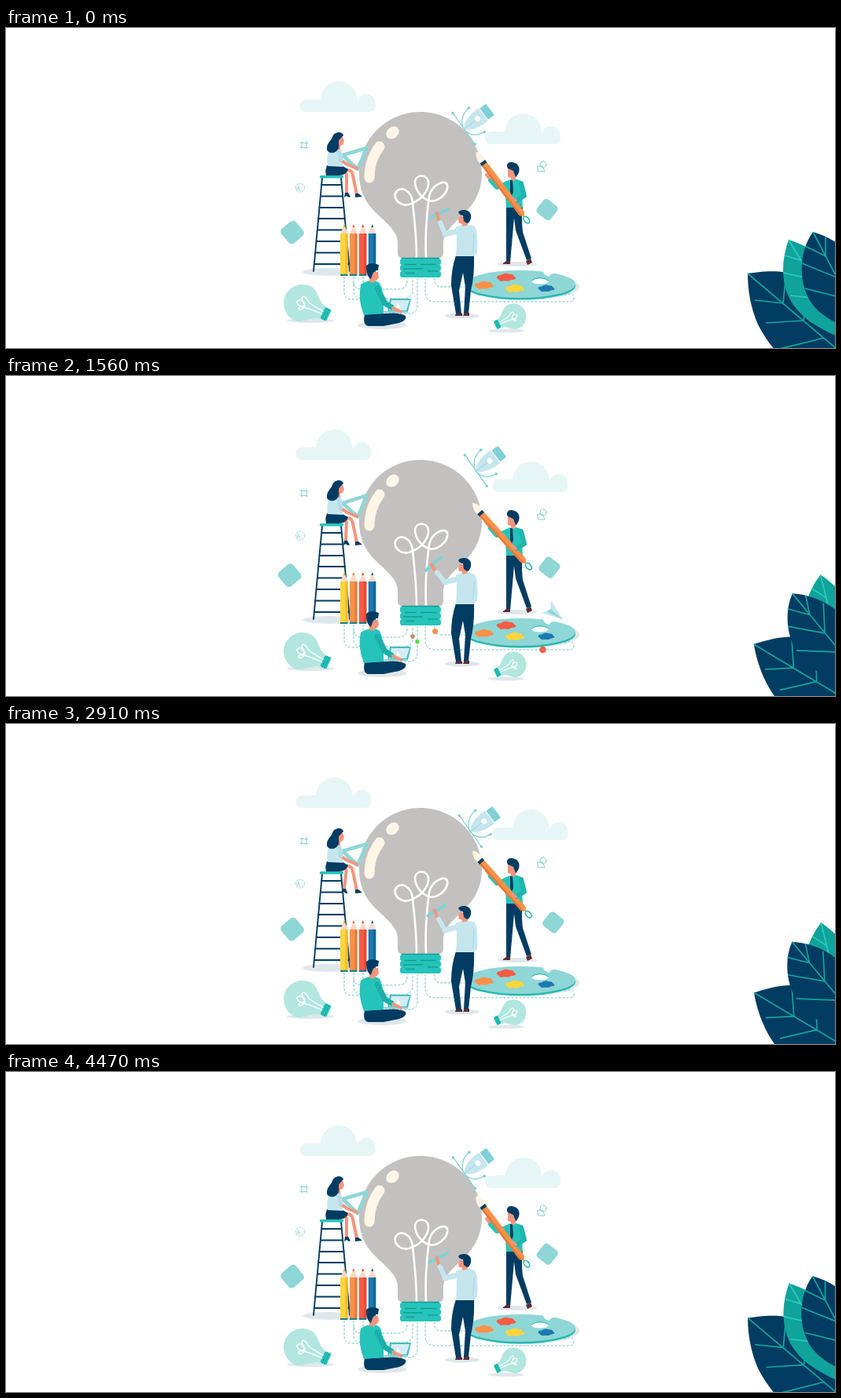
These frames come from a looping animation (1054x408 px, 4500 ms). An HTML page:

```html
<!DOCTYPE html>
<html lang="en">
<head>
<meta charset="utf-8">
<title>Creative team around a light bulb</title>
<style>
html, body { margin: 0; width: 100%; height: 100%; overflow: hidden; background: #fff; }
svg { display: block; width: 100vw; height: 100vh; }
.navy { fill: #023c62; } .teal { fill: #25c4bb; } .aqua { fill: #8fd6d6; } .pale { fill: #c6e6ee; }
.skin { fill: #f2957d; } .shade { fill: #dfe7ea; } .cloud { fill: #e6f5f6; } .green { fill: #10a39b; }
.line { fill: none; stroke-linecap: round; stroke-linejoin: round; }
.wire { fill: none; stroke: #6cc3cc; stroke-dasharray: 3 2; }
.vein { fill: none; stroke: #12a59d; stroke-width: 1.7; }
.limb { fill: none; stroke: #f2957d; stroke-width: 4; stroke-linecap: round; stroke-linejoin: round; }
</style>
</head>
<body>
<svg viewBox="0 0 1054 408" preserveAspectRatio="none">
<defs>
  <g id="cloud" class="cloud">
    <rect x="374" y="91" width="96" height="16" rx="8"/>
    <path d="M400 107V91a23 23 0 0 1 46 0v16z"/>
    <circle cx="458" cy="95.5" r="11.5"/><circle cx="388" cy="99" r="8"/>
  </g>
  <path id="glass" d="M527 107C484 107 449 142 449 185C449 214 462 228 476 241C490 254 498 262 498 275V287Q498 293 504 293H550Q556 293 556 287V275C556 262 566 252 579 240C592 228 605 212 605 185C605 142 570 107 527 107Z"/>
  <path id="filament" class="line" stroke="#fff" d="M522 293C522 262 518 235 517 222C515 206 500 200 495 211C493 221 505 230 517 223C530 218 538 205 537 196C535 186 521 186 520 196C520 208 530 218 538 220C548 223 563 211 561 200C558 192 541 200 538 215C535 235 533 265 534 293"/>
  <g id="shine">
    <ellipse cx="491.5" cy="133.500" rx="9" ry="7.200" transform="rotate(-42 491.500 133.500)"/>
    <path class="line" stroke-width="13" d="M475 151C466 163 462 175 462 191"/>
  </g>
  <g id="mini">
    <path fill="#b2e6df" d="M0-24A24 24 0 1 0 0 24C12 24 18 9 28 9V-9C18-9 12-24 0-24Z"/>
    <rect class="teal" x="28" y="-8" width="9" height="16" rx="2"/>
    <path d="M31-8V8M34-8V8" stroke="#17a39b"/>
    <path class="line" stroke="#fff" stroke-width="1.400" d="M28-2C14-3 9-3 6-5C-3-12 -6-7 -2-4C3 0 5 1 1 4C-4 5 -8 3 -7 0C-6-4 -2-3 3 0C7 4 0 12 -2 8C-2 4 10 2 28 2"/>
  </g>
  <path id="splat" d="M-12 1C-13-4 -6-2 -5-4C0-7 3-4 6-4C10-4 9-1 12 0C13 4 6 2 5 4C1 6 -2 3 -5 5C-9 5 -8 3 -12 1Z"/>
</defs>

<use id="cloudL" href="#cloud"/>
<use id="cloudR" href="#cloud"/>

<!-- small icons -->
<g class="line" stroke="#7fd0d2">
  <path d="M376 145v9M382 144v9M374 146l10 1M374 152l10 1"/>
  <g stroke-dasharray="2 2"><circle cx="374" cy="203.500" r="5.500"/></g>
  <path d="M676 176l6 0 3 7-8 0z"/><circle cx="683" cy="174" r="4"/>
</g>
<text x="369" y="207" font-family="Inter, sans-serif" font-size="8" fill="#7fd0d2">A</text>
<g id="tileL"><rect class="aqua" x="-12" y="-12" width="24" height="24" rx="5" transform="rotate(-40)"/></g>
<g id="tileR"><rect class="aqua" x="-11" y="-11" width="22" height="22" rx="4.500" transform="rotate(38)"/></g>

<g id="plane">
  <path class="pale" d="M14 0L-13-10L-7 0Z"/>
  <path class="pale" d="M14 0L-13 10L-7 1Z"/>
  <path class="aqua" d="M14 0L-7-1L-9 5Z"/>
</g>

<!-- floor shadows -->
<g class="shade">
  <ellipse cx="412" cy="311" rx="35" ry="5"/><ellipse cx="478" cy="379" rx="31" ry="5"/>
  <ellipse cx="387" cy="373" rx="30" ry="3"/><ellipse cx="636" cy="386" rx="23" ry="2.500"/>
  <ellipse cx="580" cy="367" rx="22" ry="3.500"/><ellipse cx="650" cy="301" rx="25" ry="3"/>
  <ellipse cx="659" cy="330" rx="70" ry="17"/>
</g>

<!-- wires and their pulses -->
<g id="wires" class="wire">
  <path d="M442 317V335Q442 345 453 345H504Q517 345 517 334V319"/>
  <path d="M454 317V352Q454 364 464 364H511Q523 364 523 353V319"/>
  <path d="M466 317V325Q466 333 474 333H498Q510 333 510 322V319"/>
  <path d="M585 330H554Q545 330 545 322V319"/>
  <path d="M711 341Q709 338 718 339Q722 340 722 344Q722 349 716 349H546Q533 349 533 337V319"/>
</g>
<path class="wire" d="M430 317V336Q430 346 440 346H450M442 325Q443 333 452 333"/>
<g id="dots"></g>

<!-- main bulb -->
<use href="#glass" fill="#c2c1bf"/>
<use href="#shine" fill="#fdf5e6" stroke="#fdf5e6" stroke-width="0"/>
<use href="#filament" stroke-width="2.600"/>
<g id="glow">
  <use href="#glass" fill="#ffd53e"/>
  <path fill="#ffc533" d="M530 107C570 112 590 146 590 180C590 208 577 226 560 240C540 253 528 262 528 278V293H550Q556 293 556 287V275C556 262 566 252 579 240C592 228 605 212 605 185C605 142 570 107 530 107Z"/>
  <use href="#shine" fill="#fffbc4" stroke="#fffbc4" stroke-width="0"/>
  <use href="#filament" stroke-width="2"/>
</g>
<rect x="503" y="293" width="48" height="24" fill="#17a39b"/>
<g class="teal">
  <rect x="501" y="294" width="52" height="8" rx="3"/><rect x="501" y="302" width="52" height="8" rx="3"/>
  <rect x="501" y="310" width="52" height="8" rx="3"/>
</g>
<path d="M503 293.500H551M507 301.500H522M527 301.500H547M505 307H530M536 310H549M508 312.500H520" stroke="#149c95" stroke-width="1.300"/>

<!-- design pen -->
<g id="pen">
  <g class="line" stroke="#7fcfd6" stroke-width="1.200">
    <path d="M568 108L596 148M589 102C577 110 578 128 585 132C593 138 601 137 608 132"/>
  </g>
  <g fill="#7fcfd6">
    <circle cx="568" cy="108.500" r="1.800"/><circle cx="588.500" cy="102" r="1.800"/>
    <circle cx="608" cy="132.500" r="1.800"/><circle cx="596" cy="148" r="1.800"/>
  </g>
  <g transform="translate(582 129) rotate(-37)">
    <path class="pale" d="M0 0C5-6 14-11 31-10V10C14 11 5 6 0 0Z"/>
    <path d="M0 0H20" stroke="#9fd7df"/><circle cx="22" cy="0" r="3.500" fill="#fff"/>
    <rect x="32" y="-9" width="10" height="18" rx="1.500" fill="#7fcfd6"/>
  </g>
</g>

<!-- ladder -->
<g class="line" stroke="#023c62" stroke-width="1.900">
  <path d="M402 191L391 310M426 191L437 310"/><path id="rungs"/>
</g>
<rect class="teal" x="399" y="188" width="30" height="3.500" rx="1"/>

<!-- woman on the ladder -->
<g id="ruler"><path class="line" stroke="#8fd6d6" stroke-width="4.500" d="M428 162L459 153L447 180Z"/></g>
<g id="leg">
  <path class="limb" d="M425 183Q434 181 433 190L433 212"/>
  <path class="navy" d="M431 210h4l3 5-2 1-3-2-3 2z"/>
</g>
<path class="limb" d="M430 182Q440 179 441 188L446 212"/>
<path class="navy" d="M444 211h4l5 4-9 1z"/>
<path class="navy" d="M409 174Q405 180 407 188H424Q433 187 435 180L426 175Z"/>
<path class="pale" d="M411 154Q418 150 424 153Q429 158 428 177L409 176Q407 164 411 154Z"/>
<path class="limb" stroke-width="3" d="M425 168L434 174L446 179"/>
<path class="line" stroke="#b5dde8" stroke-width="5" d="M422 157L426 168"/>
<path class="skin" d="M422 139h6l2 5-2 5-3 1v5h-5z"/>
<path class="navy" d="M429 137C428 131 417 132 415 139C413 144 408 147 408 153C407 160 418 161 421 156C426 151 421 147 424 142Z"/>

<g id="pencils"></g>

<!-- small bulbs -->
<use href="#mini" transform="translate(377 351) rotate(25)"/>
<use href="#mini" transform="translate(645 368) scale(-.69 .69) rotate(26)"/>

<!-- seated man -->
<path class="navy" d="M456 365L482 364Q500 362 508 367Q510 373 500 376L480 380H460Q453 378 456 365Z"/>
<path fill="#45bfc0" d="M488 345H515L511 362H485Z"/><path fill="#d3ecf2" d="M490 347H513L509 360H487Z"/>
<path d="M477 362H511" stroke="#8fd6d6" stroke-width="2"/>
<path d="M497 350l5 6-3 0-2 2z" fill="#fff"/>
<path class="teal" d="M451 327Q463 319 474 324Q481 332 480 364L455 366Q447 347 451 327Z"/>
<path class="line" stroke="#1cb0a8" stroke-width="7" d="M472 332L482 351L490 356"/>
<path class="limb" stroke-width="3" d="M492 357L502 362"/>
<path class="skin" d="M461 311h12l1 7-3 4h-3v3l-6-1z"/>
<path class="navy" d="M458 306C457 300 466 299 474 302L473 309H469L466 314L464 320Q458 316 458 306Z"/>

<!-- palette -->
<ellipse cx="654" cy="329" rx="70" ry="17.500" fill="#25b9b2"/>
<ellipse cx="654" cy="326.500" rx="70" ry="17.500" class="aqua"/>
<path fill="#fff" d="M683 308L700 312Q690 314 691 317Q682 315 683 308Z"/>
<ellipse cx="679" cy="323" rx="11" ry="3.500" fill="#fff"/>
<path class="line" stroke="#25b9b2" d="M668 322Q679 315 690 322"/>
<use href="#splat" x="608" y="328" fill="#f9914a"/><use href="#splat" x="636" y="318" fill="#f95a45"/>
<use href="#splat" x="647" y="332" fill="#ffd53e"/><use href="#splat" transform="translate(687 332) scale(.85)" fill="#1b7ab0"/>

<!-- drafting man -->
<path class="navy" d="M572 290H595Q596 315 591 335L588 364H582L584 330L581 312L576 335L579 364H572L566 328Q566 308 572 290Z"/>
<path d="M572 364h8v3h-9zM583 363h6v4h-8z" fill="#5b2e35"/>
<g id="forearm">
  <path class="limb" stroke-width="3.500" d="M552 250L549 240"/>
  <path class="line" stroke="#7fd3d6" stroke-width="4" stroke-linecap="butt" d="M539 242L562 231"/>
  <path class="limb" stroke-width="3" d="M549 239L548 236"/>
  <path class="line" stroke="#c6e6ee" stroke-width="6" d="M558 262L552 248"/>
</g>
<path class="line" stroke="#c6e6ee" stroke-width="7" d="M577 258L558 263"/>
<path class="pale" d="M572 254Q584 248 596 253Q601 262 599 287L594 291H572Q574 270 572 254Z"/>
<path d="M595 262L594 286" stroke="#a8d6e3" stroke-width="1.300"/>
<path class="skin" d="M577 240h10v11l-6 2-2-4h-3l-1-5z"/>
<path class="navy" d="M575 235C578 230 590 231 591 238C592 244 589 249 586 249L582 246L581 239Q577 239 575 235Z"/>

<!-- painter -->
<path class="navy" d="M636 228H657Q655 244 657 260L668 294L662 296L648 258L646 242L641 299H636Z"/>
<path d="M632 300l4-3h5v4h-9zM661 297l6-3 2 5-6 3z" fill="#5b2e35"/>
<path class="line" stroke="#25c4bb" stroke-width="6" d="M638 198L624 203L616 194"/>
<path class="limb" d="M614 191L611 187"/>
<path class="teal" d="M634 196Q645 190 655 195L657 229H636Z"/>
<path class="navy" d="M641 194h3l1 15-2 5-2-5z"/>
<path class="skin" d="M638 179h12v9l-4 7-4-1v-3l-4-1z"/>
<path class="navy" d="M637 177C636 169 646 170 650 174C655 179 652 187 648 190L645 182L638 179Z"/>
<g id="brush"><g transform="translate(598 160) rotate(53)">
  <path fill="#fdf3e2" d="M-2-1Q6-7 14-4V4Q6 6 -2-1Z"/>
  <path fill="#f9914a" d="M16-4H96L101 0L96 4H16Z"/><path fill="#e5793a" d="M16 1.500H99L96 4H16Z"/>
  <rect class="navy" x="13" y="-4" width="4" height="8"/>
  <ellipse class="line" cx="106" cy="0" rx="5" ry="3" stroke="#25b9b2" stroke-width="1.600"/>
</g></g>
<path class="line" stroke="#1fb6ae" stroke-width="6" d="M655 198L659 214L649 220"/>
<path class="limb" d="M648 220L644 217"/>

<!-- leaves -->
<g id="leafA">
  <path class="navy" d="M943 313C965 310 1010 302 1045 340C1070 370 1085 400 1085 450H1030C990 430 970 405 956 378C947 357 943 335 943 313Z"/>
  <path class="vein" d="M943 313L1070 421M988 351L952 347M1014 373L966 376M988 351L992 311M1014 373L1021 324M1040 395L980 410"/>
</g>
<g id="leafB">
  <path class="green" d="M995 270C984 300 985 335 1005 358C1020 378 1050 390 1072 400C1090 350 1060 290 995 270Z"/>
  <path class="vein" style="stroke:#2cc9bf" d="M995 270L1072 400M1010 296L990 290M1024 320L988 312M1040 346L997 341"/>
</g>
<g id="leafC">
  <path class="navy" d="M1026 260C1008 285 1006 325 1025 352C1040 372 1065 380 1096 394C1112 330 1080 275 1026 260Z"/>
  <path class="vein" d="M1026 260L1096 394M1042 291L1016 278M1056 318L1012 300M1071 346L1016 332M1042 291L1042 266M1056 318L1062 280"/>
</g>
</svg>

<script>
const LOOP = 4500;
const $ = id => document.getElementById(id);

// Linear interpolation through rows of [time, ...values].
function key(t, rows) {
  const n = rows.findIndex(row => row[0] >= t);
  if (n < 0) return rows[rows.length - 1].slice(1);
  if (!n) return rows[0].slice(1);
  const a = rows[n - 1], b = rows[n], k = (t - a[0]) / (b[0] - a[0]);
  return a.slice(1).map((v, i) => v + (b[i + 1] - v) * k);
}
const move = (id, [x, y], turn = 0) =>
  $(id).setAttribute('transform', `translate(${x} ${y}) rotate(${turn})`);
const spin = (id, angle, x, y) => $(id).setAttribute('transform', `rotate(${angle} ${x} ${y})`);

const rungAt = y => {
  const d = (y - 191) * 11 / 119;
  return `M${402 - d} ${y}H${426 + d}`;
};
$('rungs').setAttribute('d', [200, 214.5, 229, 243, 257.5, 272, 286.5, 301].map(rungAt).join(''));

$('pencils').innerHTML = [
  ['#ffd53e', '#f0bd2c'], ['#f9914a', '#e5793a'], ['#fb5a44', '#e04a3a'], ['#1b7ab0', '#14658f']
].map(([main, dark], i) => `<g transform="translate(${430 + i * 11.9} 0)">
  <path d="M-5 263L0 250L5 263Z" fill="#f6d9c8"/><path d="M-1.500 254L0 250L1.500 254Z" fill="${dark}"/>
  <rect x="-5" y="262" width="9.500" height="53" fill="${main}"/>
  <rect x="1.500" y="262" width="3" height="53" fill="${dark}"/>
  <rect x="-5" y="314" width="9.500" height="2" fill="#12808c"/></g>`).join('');

// One pulse per wire: colour, radius, [time, share of the path]
const pulses = [
  ['#c98a66', 2.8, [[750, .08], [900, .2], [1560, .89], [1650, 1]]],
  ['#4fe32f', 2.6, [[900, 0], [1560, .87], [1700, 1]]],
  ['#13868f', 2.8, [[1650, 0], [2490, .93], [2560, 1]]],
  ['#f9914a', 3.5, [[1150, 0], [1560, .86], [1640, 1]]],
  ['#f95f48', 4.3, [[780, 0], [900, .01], [1560, .25], [2490, .97], [2580, 1]]]
].map(([color, radius, rows], i) => {
  const path = $('wires').children[i];
  const dot = document.createElementNS('http://www.w3.org/2000/svg', 'circle');
  dot.setAttribute('fill', color);
  dot.setAttribute('r', radius);
  $('dots').append(dot);
  return { path, dot, rows, length: path.getTotalLength() };
});

function draw() {
  const t = performance.now() % LOOP;
  const sway = 1 - Math.abs(1 - t / (LOOP / 2));
  const twice = 1 - Math.abs(1 - (t % 2250) / 1125);

  move('cloudL', [-8 * sway, 0]);
  move('cloudR', [235 + 13.5 * sway, 41]);
  move('pen', key(t, [[0, 0, 0], [1125, 25, -12.5], [2250, 0, 0], [3375, 14, 14], [LOOP, 0, 0]]));
  move('tileL', key(t, [[0, 364, 260.5], [1350, 360, 253], [2700, 364, 260.5], [3600, 364, 265.5], [LOOP, 364, 260.5]]));
  move('tileR', key(t, [[0, 688, 231.5], [900, 690, 247.5], [2360, 692, 240], [3150, 697.4, 258.7], [LOOP, 688, 231.5]]));

  const [x, y, turn] = key(t, [[0, -25, 110, 15], [540, 253, 165, 15], [900, 436, 212, 25],
    [1560, 697, 302, 38], [2490, 976, 338, 80], [2750, 1080, 350, 80]]);
  move('plane', [x, y], turn);

  spin('brush', -8 * twice, 640, 213);
  spin('forearm', key(t, [[0, 0], [900, 23], [1800, -30], [2700, 0], [3600, -30], [LOOP, 0]]), 558, 264);
  spin('ruler', key(t, [[0, 0], [900, -8], [1700, 0]]), 430, 168);
  spin('leg', key(t, [[0, 0], [900, 12], [1700, 0], [2600, 12], [3300, 0]]), 432, 184);
  spin('leafA', -13.5 * sway, 1124, 280);
  spin('leafB', 24 * sway, 1072, 400);
  spin('leafC', -17.2 * sway, 1096, 394);

  $('glow').style.opacity = key(t, [[3240, 0], [3600, 1], [4100, 1], [4440, 0]])[0];

  for (const { path, dot, rows, length } of pulses) {
    const active = t > rows[0][0] && t < rows[rows.length - 1][0];
    dot.style.display = active ? '' : 'none';
    const p = path.getPointAtLength(key(t, rows)[0] * length);
    dot.setAttribute('cx', p.x);
    dot.setAttribute('cy', p.y);
  }
  requestAnimationFrame(draw);
}
draw();
</script>
</body>
</html>
```
